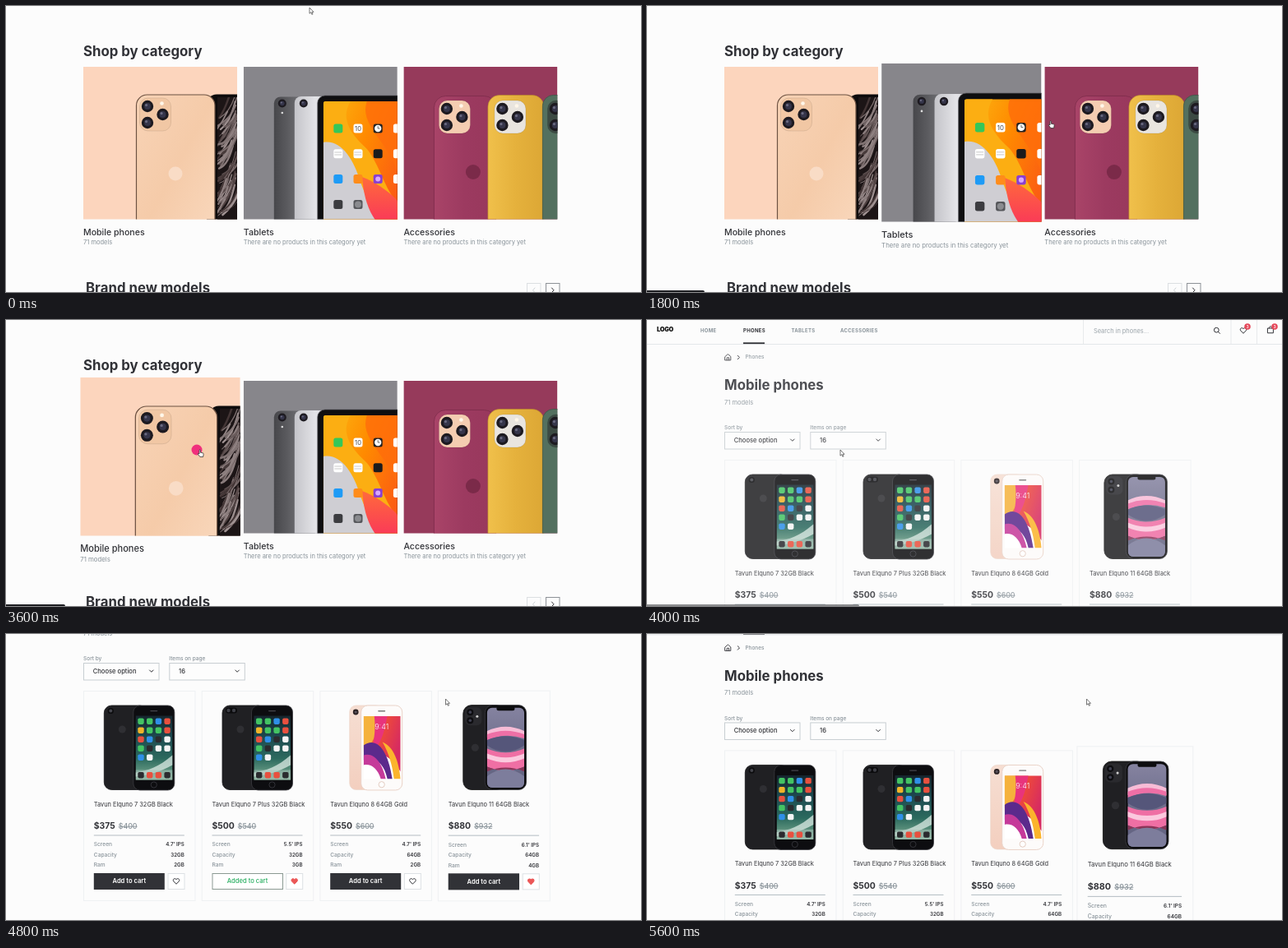
An HTML page for the animation above (5700 ms loop, 772 px wide and 348 px high).

```html
<!DOCTYPE html>
<html lang="en">
<head>
<meta charset="utf-8">
<title>Shop walkthrough</title>
<style>
  html, body { margin: 0; width: 100%; height: 100%; overflow: hidden; background: #fcfcfc; }
  svg { display: block; width: 772px; height: 348px; font-family: Inter, Roboto, sans-serif; }
</style>
</head>
<body>
<svg id="stage" viewBox="0 0 772 348" xmlns="http://www.w3.org/2000/svg"></svg>
<script>
const LOOP = 5700, STEP = 100;
const INK = '#313237', GREY = '#89939a';

// Drawing helpers
const rect = (x, y, w, h, fill, r = 0, extra = '') =>
  `<rect x="${x}" y="${y}" width="${w}" height="${h}" rx="${r}" fill="${fill}" ${extra}/>`;
const circle = (x, y, r, fill, extra = '') =>
  `<circle cx="${x}" cy="${y}" r="${r}" fill="${fill}" ${extra}/>`;
const path = (d, fill, extra = '') => `<path d="${d}" fill="${fill}" ${extra}/>`;
const stroke = (d, color, width = 1) =>
  path(d, 'none', `stroke="${color}" stroke-width="${width}" stroke-linecap="round" stroke-linejoin="round"`);
const text = (x, y, size, weight, fill, body, extra = '') =>
  `<text x="${x}" y="${y}" font-size="${size}" font-weight="${weight}" fill="${fill}" ${extra}>${body}</text>`;
const group = (x, y, body, extra = '') => `<g transform="translate(${x} ${y})" ${extra}>${body}</g>`;
const gradient = (id, colors, x2 = 0, y2 = 1) =>
  `<linearGradient id="${id}" x1="0" y1="0" x2="${x2}" y2="${y2}">` +
  colors.map((c, i) => `<stop offset="${i / (colors.length - 1)}" stop-color="${c}"/>`).join('') +
  '</linearGradient>';
const clip = (id, x, y, w, h, r = 0) => `<clipPath id="${id}">${rect(x, y, w, h, '#000', r)}</clipPath>`;

function seeded(seed) {
  return () => (seed = (seed * 16807) % 2147483647) / 2147483647;
}

const defs = `<defs>
  ${gradient('gold', ['#f8d3b6', '#f5cba9', '#f9d8bd'], 1, 1)}
  ${gradient('space', ['#47474b', '#66666a', '#79797d'], 1, 0)}
  ${gradient('silver', ['#c4c4c9', '#e3e3e7', '#d2d2d7'], 1, 0)}
  ${gradient('sun', ['#fcb813', '#ff8a00', '#fb5a13'], 1, 0.6)}
  ${gradient('coral', ['#ff6a3c', '#fa3b57'])}
  ${gradient('maroon', ['#a94468', '#9c3a60', '#98385c'], 1, 0)}
  ${gradient('mustard', ['#f0c04b', '#e5b13c', '#dca735'], 1, 0)}
  ${gradient('ocean', ['#16262e', '#1d4a50', '#2c6a5e', '#7fae93'])}
  ${gradient('ember', ['#f7a63a', '#ee4a3a', '#d62a62'], 1, 0.5)}
  ${gradient('slate', ['#8583a0', '#6f6e8c', '#5f607e'])}
  ${gradient('rosy', ['#f6ded2', '#f3cfbf'])}
  ${clip('tile', 0, 0, 187, 185.5)}
  ${clip('feathers', 163, 37, 30, 160)}
  ${clip('tabletScreen', 97, 42, 100, 150, 3)}
  ${clip('roseScreen', 53, 30.5, 45, 76.5)}
  ${clip('waveScreen', 59.5, 20.5, 45, 97, 6)}
</defs>`;

const lens = (x, y, r) => circle(x, y, r, '#1d1a20') + circle(x, y, r * 0.55, '#35354a') +
  circle(x - r * 0.2, y - r * 0.2, r * 0.22, '#6a6a80');
const tripleCamera = (x, y, plate) => rect(x, y, 38, 40, plate, 10, 'stroke="#0002" stroke-width=".7"') +
  lens(x + 9.5, y + 10, 7.2) + lens(x + 9.5, y + 30, 7.2) + lens(x + 28, y + 20, 7.2) +
  circle(x + 27, y + 6.5, 2.3, '#fff7ea');

// Category pictures
function goldPhones() {
  const random = seeded(11);
  let feathers = '';
  for (let i = 0; i < 60; i++) {
    const x = 160 + random() * 12, y = 62 + random() * 120, bend = 6 + random() * 14;
    const shade = 50 + Math.floor(random() * 100);
    feathers += stroke(`M${x} ${y}q${bend} ${-4 - random() * 8} ${bend + 6} ${-22 - random() * 16}`,
      `rgb(${shade + 14},${shade},${shade})`, 0.8 + random() * 2);
  }
  return rect(0, 0, 187, 186, '#fcd5bd') +
    rect(150, 33.5, 70, 180, '#0d0b0c', 12) +
    `<g clip-path="url(#feathers)">${rect(163, 37, 30, 160, '#1c1516')}${feathers}</g>` +
    rect(64.5, 34, 95.5, 180, 'url(#gold)', 13, 'stroke="#6d5242" stroke-width="1.2"') +
    tripleCamera(68.5, 38, '#f1c7a4') + circle(112, 130, 8.5, '#f9dcc6');
}

function tablets() {
  const rows = [
    ['#35c759', '#fff', '#222', '#fff'], ['#fff', '#fff', '#1b1b1d', '#fff'],
    ['#1e9bf6', '#ff8c1a', '#8a3fd0', '#fff'], ['#3c3c40', '#55565a']
  ];
  const icons = rows.map((row, j) => row.map((color, i) =>
    rect(109.5 + i * 24.2, 69.5 + j * 30.8, 11, 11, color, 2.5)).join('')).join('');
  const screen = rect(97, 42, 100, 150, 'url(#sun)') +
    path('M97 42H130C118 62 128 80 150 100 165 118 172 150 187 165V186H97Z', '#fcae12') +
    path('M97 92C118 88 134 112 142 140 150 160 154 172 160 186H97Z', '#cfced3') +
    path('M144 134C160 140 178 152 190 166V186H160C150 172 146 155 144 134Z', 'url(#coral)') +
    path('M150 42C140 70 175 90 187 128V42Z', '#ff6d0a', 'opacity=".8"');
  return rect(0, 0, 187, 186, '#87868b') +
    rect(37, 36.5, 50, 180, 'url(#space)', 8) + rect(62, 36, 50, 180, 'url(#silver)', 8) +
    lens(47, 44.5, 5) + lens(73, 44.5, 5) + circle(47, 56, 1.3, '#ddd') +
    rect(90, 35, 130, 180, '#0e0e10', 9, 'stroke="#55555a" stroke-width=".7"') +
    `<g clip-path="url(#tabletScreen)">${screen}</g>` + icons +
    text(139.2, 78, 7.5, 400, '#444', '10', 'text-anchor="middle"') +
    circle(163.4, 75, 4.2, '#fff') + stroke('M163.4 72.5V75h2', '#333', 0.7) +
    stroke('M111 104h8M111 107h8M135 104h8M135 107h8', '#bbb', 0.8) +
    circle(163.4, 136.6, 3, '#d9a8ff') + circle(139.2, 167.5, 4, '#8a8b8f');
}

function cases() {
  return rect(0, 0, 187, 186, '#963a5b') +
    rect(37, 35.5, 75, 180, 'url(#maroon)', 14, 'stroke="#7d2b4b" stroke-width=".8"') +
    tripleCamera(43, 41, '#f4cdb1') + circle(84.5, 128, 9, '#7b2a49') +
    rect(102.5, 34.5, 68, 180, 'url(#mustard)', 14, 'stroke="#b98a28" stroke-width=".6"') +
    tripleCamera(110.5, 41, '#e9e5df') +
    rect(169, 34.5, 70, 180, '#53705f', 13, 'stroke="#3d5547" stroke-width=".8"') +
    tripleCamera(175, 41, '#3c4a43');
}

const categories = [
  { x: 94, title: 'Mobile phones', note: '71 models', art: goldPhones() },
  { x: 288.8, title: 'Tablets', note: 'There are no products in this category yet', art: tablets() },
  { x: 483.4, title: 'Accessories', note: 'There are no products in this category yet', art: cases() }
];

const categoryCard = (c, i) => `<g id="category${i}">` + group(c.x, 74,
  `<g clip-path="url(#tile)">${c.art}</g>` +
  text(0, 204.5, 10.6, 500, INK, c.title) + text(0, 216, 7.5, 400, GREY, c.note)) + '</g>';

const home = '<g id="home">' +
  text(94, 60.7, 16.8, 700, INK, 'Shop by category') +
  text(97, 348.5, 16.8, 700, INK, 'Brand new models') +
  rect(633.5, 337.5, 16.5, 16.5, 'none', 0, 'stroke="#dcdfe2"') +
  rect(656.5, 337.5, 16.5, 16.5, 'none', 0, 'stroke="#8d9297"') +
  stroke('M643 343l-2.5 2.8 2.5 2.8', '#d0d4d8') + stroke('M663.5 343l2.5 2.8-2.5 2.8', INK) +
  categories.map(categoryCard).join('') + '</g>';

// Product pictures, relative to the card corner
function darkPhone(dual) {
  const palette = ['#43c463', '#f4f4f4', '#f0b429', '#2f8fe8', '#e8503f', '#fff', '#2b2b2f', '#f4f4f4'];
  const random = seeded(23);
  let icons = '';
  for (const y of [33, 44, 55, 66, 77, 98.5]) {
    for (let i = 0; i < 4; i++) {
      if (y === 77 && i > 1) continue;
      const color = palette[Math.floor(random() * palette.length)];
      icons += rect(66 + i * 10.7, y, 7.4, 7.4, color, 1.8);
    }
  }
  const camera = dual ? rect(29, 20, 14, 7, '#0b0b0d', 3.5) + circle(32.5, 23.5, 2.2, '#3d3e45') +
    circle(39, 23.5, 2.2, '#3d3e45') : circle(33, 24, 3.6, '#0c0c0e') + circle(33, 24, 2, '#44454c');
  return rect(25, 17.5, 52, 102.5, '#202023', 9, 'stroke="#151517" stroke-width=".8"') + camera +
    circle(47, 46.5, 4.5, '#2f2f33') +
    rect(60.5, 17.5, 50, 103, '#0d0d10', 8, 'stroke="#3b3b40" stroke-width=".8"') +
    rect(63.5, 30, 44.5, 78, 'url(#ocean)') +
    path('M63.5 99C78 97 92 92 108 78V90C94 98 80 102 63.5 104Z', '#dcebe4', 'opacity=".75"') +
    rect(63.5, 96, 44.5, 12, '#a9c4bb', 0, 'opacity=".55"') + icons +
    rect(81, 23.5, 9, 1.2, '#46464c', 0.6) + circle(85.5, 114, 3.6, '#0d0d10', 'stroke="#3d3d43" stroke-width=".8"');
}

function rosePhone() {
  const screen = rect(53, 30, 45, 78, '#fff') +
    path('M53 30H98V98C90 84 78 74 53 70Z', 'url(#ember)') +
    path('M53 30H70C72 48 66 62 53 74Z', '#f5b23c') +
    path('M66 30H82C78 50 76 62 62 76 66 60 68 46 66 30Z', '#e8347c') +
    path('M53 66C66 56 82 66 88 107H82C78 88 68 80 53 84Z', '#5b2a8c') +
    path('M53 78C66 74 76 88 80 107H74C70 94 62 88 53 90Z', '#c53a9a') +
    path('M76 62C90 68 96 86 98 107H90C88 90 84 76 76 62Z', '#fbb42c');
  return rect(36, 17.5, 40, 102.5, 'url(#rosy)', 8, 'stroke="#ecd6cb" stroke-width=".7"') +
    circle(43.5, 25.5, 3.4, '#2b2224') + circle(43.5, 25.5, 1.6, '#59525c') +
    rect(50, 17.5, 50, 103, '#fdfbfa', 8, 'stroke="#ead3c8" stroke-width="1"') +
    `<g clip-path="url(#roseScreen)">${screen}</g>` +
    text(75, 46.5, 9, 300, '#fff', '9:41', 'text-anchor="middle"') +
    rect(70.5, 23.5, 9, 1.4, '#777', 0.7) + circle(75, 113.7, 3.6, '#fff', 'stroke="#dcbfb2" stroke-width=".8"');
}

function wavePhone() {
  const screen = rect(59, 20, 46, 98, 'url(#slate)') +
    path('M59 49Q82 38 105 49V57Q82 47 59 57Z', '#f7bcd6') +
    path('M59 53Q82 44 105 53V58Q82 50 59 60Z', '#ee6fa6') +
    path('M59 60Q82 50 105 60V66Q82 82 59 66Z', '#55567a') +
    path('M59 70Q82 80 105 70V92Q82 102 59 92Z', '#ef6fa4') +
    path('M59 76Q82 86 105 76V82Q82 92 59 82Z', '#fbc9de') +
    path('M59 92Q82 102 105 92V98Q82 88 59 98Z', '#8a3558') +
    path('M59 104Q82 86 105 104V118H59Z', '#7d7d9c');
  return rect(30.5, 17.5, 50, 102.5, '#202023', 10, 'stroke="#111" stroke-width=".8"') +
    rect(33, 20, 20, 22, '#2a2a2e', 6) + circle(39, 26, 4, '#0d0d10') + circle(39, 36, 4, '#0d0d10') +
    circle(39, 26, 1.8, '#3f4050') + circle(39, 36, 1.8, '#3f4050') + circle(47.5, 31, 1.5, '#ccc') +
    circle(45, 69, 4.5, '#2f2f33') +
    rect(57, 17.5, 50, 102.5, '#0c0c0e', 9, 'stroke="#3a3a3f" stroke-width=".8"') +
    `<g clip-path="url(#waveScreen)">${screen}</g>` + rect(71, 19, 22, 5, '#0c0c0e', 2.5);
}

const products = [
  { name: 'Tavun Elquno 7 32GB Black', price: 375, old: 400, specs: ["4.7' IPS", '32GB', '2GB'], art: darkPhone(false) },
  { name: 'Tavun Elquno 7 Plus 32GB Black', price: 500, old: 540, specs: ["5.5' IPS", '32GB', '3GB'], art: darkPhone(true), added: true, liked: true },
  { name: 'Tavun Elquno 8 64GB Gold', price: 550, old: 600, specs: ["4.7' IPS", '64GB', '2GB'], art: rosePhone() },
  { name: 'Tavun Elquno 11 64GB Black', price: 880, old: 932, specs: ["6.1' IPS", '64GB', '4GB'], art: wavePhone(), liked: true }
];

const heart = (x, y, fill, line) => path(
  `M${x} ${y + 3.5}l-3.2-3.3c-1.8-2.2 1.2-4.8 3.2-2.3 2-2.5 5 .1 3.2 2.3z`, fill,
  `stroke="${line}" stroke-width="1" stroke-linejoin="round"`);

function productCard(p, i) {
  const specs = ['Screen', 'Capacity', 'Ram'].map((label, j) => {
    const y = 189 + j * 12.5;
    return text(12.5, y, 6.6, 500, GREY, label) + text(122.5, y, 6.2, 600, INK, p.specs[j], 'text-anchor="end"');
  }).join('');
  const button = p.added
    ? rect(13, 222, 85.5, 19, '#fff', 0, 'stroke="#8b9a93"') +
      text(55.5, 234, 7.6, 500, '#27ae60', 'Added to cart', 'text-anchor="middle"')
    : rect(12.5, 221.5, 86, 20, INK) + text(55.5, 234, 7.6, 600, '#fff', 'Add to cart', 'text-anchor="middle"');
  const body = rect(0.2, 0, 135.5, 255, '#fcfcfc', 0, 'stroke="#eff1f3"') + p.art +
    text(12.5, 140.5, 7.4, 400, INK, p.name) +
    text(12.5, 167.7, 10.4, 700, INK, `$${p.price}<tspan dx="4" font-size="8.8" font-weight="500" fill="${GREY}" text-decoration="line-through">$${p.old}</tspan>`) +
    rect(12.5, 175, 110, 1, '#b4bdc3') + specs + button +
    rect(102.7, 222, 20, 19, '#fff', 0, 'stroke="#dde1e4"') +
    (p.liked ? heart(112.7, 231.3, '#eb5757', '#eb5757') : heart(112.7, 231.3, 'none', INK));
  return `<g id="product${i}">${group(94.3 + 143.7 * i, 170.5, body)}</g>`;
}

const select = (x, label, value) =>
  text(x, 133.3, 6.5, 500, GREY, label) +
  rect(x + 0.5, 136.5, 91.5, 20.5, '#fdfdfd', 0, 'stroke="#c8ced2"') +
  text(x + 11.7, 149, 7.6, 500, INK, value) + stroke(`M${x + 80.5} 145l2.3 2.3 2.3-2.3`, INK);

const navItem = (x, label, fill = GREY) => text(x, 14.8, 6, 700, fill, label, 'letter-spacing=".3"');
const badge = (x, n) => circle(x, 8, 3.8, '#e5485a') +
  text(x, 9.8, 5, 600, '#fff', n, 'text-anchor="middle"');

const header = rect(0, 29, 772, 1, '#e4e7ea') +
  [530, 709.5, 741].map(x => rect(x, 0, 1, 29, '#e8eaec')).join('') +
  text(12, 14.4, 7.4, 900, '#111', 'LOGO', 'letter-spacing="-.25"') +
  navItem(65, 'HOME') + navItem(117, 'PHONES', INK) + navItem(175.5, 'TABLETS') + navItem(235, 'ACCESSORIES') +
  rect(117, 27.3, 26, 1.8, INK) +
  text(543, 15.6, 7.4, 400, '#9aa3a9', 'Search in phones...') +
  circle(692.3, 12.2, 2.9, 'none', `stroke="${INK}"`) + stroke('M694.5 14.4l2 2', INK) +
  heart(725, 12.8, 'none', INK) + badge(730, 3) +
  stroke('M754.8 10h6.6v5.8h-6.6zM756.3 10c0-3 3.6-3 3.6 0', INK) + badge(763, 3);

const catalog = '<g id="catalog">' + header + '<g id="content">' +
  stroke('M95 44.5l3.4-3 3.4 3v4.4H95zM97.2 48.8v-3h2.4v3', INK, 0.9) +
  stroke('M110.3 43.3l2.2 2.2-2.2 2.2', INK) +
  text(119.5, 47.3, 6.4, 500, GREY, 'Phones') +
  text(94, 85.2, 16.8, 700, INK, 'Mobile phones') + text(94, 103, 7.5, 400, GREY, '71 models') +
  select(94, 'Sort by', 'Choose option') + select(198.3, 'Items on page', '16') +
  products.map(productCard).join('') + '</g></g>';

const overlay = path('', '#1f2024', 'id="status"') + circle(232, 158, 6.5, '#f0307c', 'id="tap"') +
  '<g id="cursor">' +
  path('M0 0V7.2L1.7 5.7 2.9 8.3 4 7.8 2.8 5.3H5Z', '#fff', 'id="arrow" stroke="#555" stroke-width=".8" stroke-linejoin="round"') +
  path('M0 .3C.6-.4 1.4-.1 1.4.8V3.2L4.2 3.8C5 4 5.2 4.5 5.1 5.3L4.6 8.6H.9L-1.6 5.2C-1.8 4.3-.8 4.1 0 5Z', '#fff', 'id="hand" stroke="#333" stroke-width=".8" stroke-linejoin="round"') +
  '</g>';

const stage = document.getElementById('stage');
stage.innerHTML = defs + home + catalog + overlay;
const el = id => document.getElementById(id);
const show = (id, on) => el(id).setAttribute('display', on ? 'inline' : 'none');

// Motion
const clamp = v => Math.min(1, Math.max(0, v));
const smooth = v => { v = clamp(v); return v * v * (3 - 2 * v); };
const ramp = (t, start, duration) => clamp((t - start) / duration);
const easeOut = p => 1 - (1 - p) ** 2;

const HOVER_MS = 280, HOVER_SCALE = 0.04, CLICK = 3560;
const hovers = [
  [[620, 1330], [2990, 9999]],
  [[1330, 1780], [2490, 2990]],
  [[1780, 2490]]
];
const hoverLevel = (t, spans) => spans.reduce((sum, [on, off]) =>
  sum + smooth((t - on) / HOVER_MS) - smooth((t - off) / HOVER_MS), 0);

const route = [
  [0, 369, 2], [620, 278, 98], [900, 237, 133], [1200, 239, 134], [1330, 300, 138], [1780, 482, 140],
  [2000, 570, 140], [2300, 572, 140], [2490, 478, 139], [2600, 418, 138], [2990, 282, 146],
  [3300, 235, 158], [4200, 235, 158], [4480, 534.5, 79], [LOOP, 534.5, 79]
];

function cursorAt(t) {
  const i = Math.max(1, route.findIndex(k => k[0] >= t));
  const [t0, x0, y0] = route[i - 1], [t1, x1, y1] = route[i];
  const p = (t - t0) / (t1 - t0);
  return [x0 + (x1 - x0) * p, y0 + (y1 - y0) * p];
}

function zoom(id, level, cx, cy) {
  const s = 1 + HOVER_SCALE * level;
  el(id).setAttribute('transform', `translate(${cx} ${cy}) scale(${s}) translate(${-cx} ${-cy})`);
}

function render(t) {
  const onCatalog = t >= 3750;
  show('home', !onCatalog);
  show('catalog', onCatalog);

  categories.forEach((c, i) => zoom('category' + i, hoverLevel(t, hovers[i]), c.x + 93.5, 183));
  zoom('product3', smooth((t - 4750) / HOVER_MS), 593.2, 298);

  const scroll = 107 * (easeOut(ramp(t, 4500, 393)) - easeOut(ramp(t, 5410, 393)));
  el('catalog').setAttribute('transform', `translate(0 ${-scroll})`);
  el('content').setAttribute('opacity', ramp(t, 3700, 350));

  const onPhones = hovers[0].some(([on, off]) => t >= on && t < off);
  const width = onCatalog ? 258 : onPhones ? 72 : 70;
  el('status').setAttribute('d', `M0 346H${width - 2}q2 0 2 2H0Z`);
  el('status').setAttribute('opacity', ramp(t, 750, 300) * (1 - ramp(t, 3850, 300)));

  show('tap', t >= CLICK && t < CLICK + 130);

  const [x, y] = cursorAt(t);
  el('cursor').setAttribute('transform', `translate(${x} ${y})`);
  const pointing = t >= 620 && !onCatalog;
  show('hand', pointing);
  show('arrow', !pointing);
}

const began = performance.now();
function tick() {
  const t = (performance.now() - began) % LOOP;
  render(Math.floor(t / STEP) * STEP);
  requestAnimationFrame(tick);
}
tick();
</script>
</body>
</html>
```
